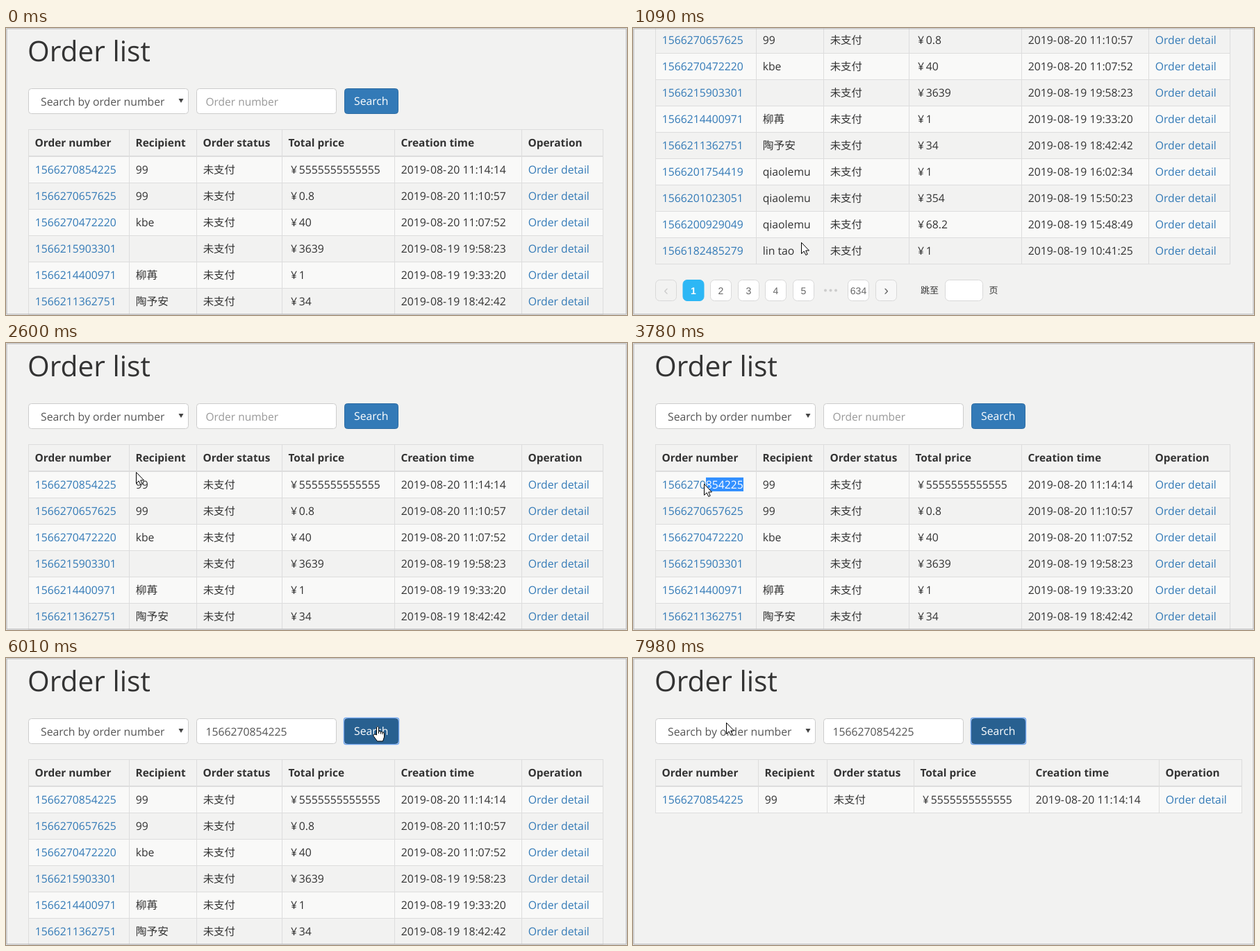
Recreate the animation shown at these times as an HTML page. Size 894x414 px, loop 8 s.

```html
<!DOCTYPE html>
<html lang="en">
<head>
<meta charset="utf-8">
<title>Order list</title>
<style>
  html, body { margin: 0; width: 100%; height: 100%; overflow: hidden; background: #f2f2f1; }
  svg { display: block; }
  text { font: 15.75px "Open Sans", "Noto Sans CJK SC", "Noto Sans CJK", sans-serif; fill: #333; text-rendering: geometricPrecision; white-space: pre; }
  .h1 { font-size: 40.7px; }
  .th { font-size: 15.4px; font-weight: 700; }
  .cjk { font-size: 15.4px; }
  .dash { letter-spacing: 1.2px; }
  .link { fill: #337ab7; }
  .field { fill: #555; }
  .hint { fill: #999; font-size: 15.5px; }
  .white { fill: #fff; }
  .page { font: 14px "Liberation Sans", Arial, sans-serif; fill: #666; text-anchor: middle; }
  .on { fill: #fff; font-weight: 700; }
  .step { font-size: 20px; }
  .off { fill: #ccc; }
  .jump { font-size: 13px; }
</style>
</head>
<body>
<svg id="stage" width="894" height="414" viewBox="0 0 894 414"></svg>
<script>
const LOOP = 8000, STEP = 80, SCROLL = 225, NUMBER = '1566270854225';

const heads = ['Order number', 'Recipient', 'Order status', 'Total price', 'Creation time', 'Operation'];
const orders = [
  [NUMBER, '99', '5555555555555', '20 11:14:14'],
  ['1566270657625', '99', '0.8', '20 11:10:57'],
  ['1566270472220', 'kbe', '40', '20 11:07:52'],
  ['1566215903301', '', '3639', '19 19:58:23'],
  ['1566214400971', '柳苒', '1', '19 19:33:20'],
  ['1566211362751', '陶予安', '34', '19 18:42:42'],
  ['1566201754419', 'qiaolemu', '1', '19 16:02:34'],
  ['1566201023051', 'qiaolemu', '354', '19 15:50:23'],
  ['1566200929049', 'qiaolemu', '68.2', '19 15:48:49'],
  ['1566182485279', 'lin tao', '1', '19 10:41:25']
];

const text = (x, y, s, cls = '') => `<text x="${x}" y="${y}" class="${cls}">${s}</text>`;
const box = (x, y, w, h, fill, stroke, r = 4, more = '') =>
  `<rect x="${x + .5}" y="${y + .5}" width="${w}" height="${h}" rx="${r}" fill="${fill}" stroke="${stroke}" ${more}/>`;

function table(cols, rows) {
  const left = cols[0], right = cols[cols.length - 1], bottom = 185 + 38 * rows.length;
  const dash = '<tspan class="dash">-</tspan>';
  let back = '', cells = '', lines = `M${left} 146.5H${right + 1}`;
  heads.forEach((h, i) => cells += text(cols[i] + 9.5, 171, h, 'th'));
  rows.forEach(([id, name, price, time], r) => {
    const y = 185 + 38 * r;
    if (r % 2 == 0) back += `<rect x="${left}" y="${y}" width="${right - left}" height="38" fill="#f9f9f8"/>`;
    lines += `M${left} ${y + 38.5}H${right + 1}`;
    const row = [[id, 'link'], [name], ['未支付', 'cjk'], ['¥'], [`2019${dash}08${dash}${time}`], ['Order detail', 'link']];
    row.forEach(([s, cls], i) => cells += text(cols[i] + (i == 3 ? 13 : 9.7), y + 25, s, cls));
    cells += text(cols[3] + 24.7, y + 25, price);
  });
  for (const x of cols) lines += `M${x + .5} 146V${bottom + 1}`;
  return `${back}<path d="${lines}" stroke="#ddd"/><path d="M${left} 185H${right + 1}" stroke="#ddd" stroke-width="2"/>${cells}`;
}

function pager() {
  const button = (x, s, cls, fill = '#fff', stroke = '#d9d9d9', y = 608.5) =>
    box(x, 588, 30, 30, fill, stroke, 6) + text(x + 15.5, y, s, 'page ' + cls);
  const dots = [277, 284.5, 292].map(x => `<circle cx="${x}" cy="603.5" r="2" fill="#ccc"/>`).join('');
  return button(32, '‹', 'step off', '#f2f2f1', '#d9d9d9', 610) + button(71.5, 1, 'on', '#2db7f5', '#2db7f5')
    + [2, 3, 4, 5].map((n, i) => button(111 + Math.round(i * 39.6), n, '')).join('')
    + dots + button(309, 634, '') + button(349, '›', 'step', '#f7f7f7', '#d9d9d9', 610)
    + text(414, 607.5, '跳至', 'jump') + box(449, 588, 54, 30, '#fff', '#d9d9d9', 6) + text(512.5, 607.5, '页', 'jump');
}

stage.innerHTML = `
  <clipPath id="clip"><rect id="range" y="194" height="20"/></clipPath>
  <g id="view">
    ${text(31, 48.3, 'Order list', 'h1')}
    ${box(32, 87, 230, 36, '#fff', '#ccc')}
    ${text(50, 112, 'Search by order number', 'field')}
    <path d="M248.5 102h7l-3.5 6z" fill="#444"/>
    <rect id="glow" x="272.5" y="85.5" width="205" height="40" rx="6" fill="none" stroke="#66afe9" stroke-width="3" opacity=".35"/>
    ${box(274, 87, 201, 36, '#fff', '#ccc', 4, 'id="field"')}
    <text id="value" x="287.5" y="112"></text>
    ${box(487, 87, 77, 36, '#337ab7', '#2e6da4', 4, 'id="button"')}
    ${box(486, 86, 79, 38, 'none', '#6ea5ee', 3, 'id="ring" stroke-width="1.5"')}
    ${text(501, 111, 'Search', 'white')}
    <g id="full">${table([32, 177, 274, 397, 559, 742, 859], orders)}${pager()}</g>
    <g id="found">${table([32, 180, 279, 404, 570, 757, 876], orders.slice(0, 1))}</g>
    <g id="marked" clip-path="url(#clip)">
      <rect x="42" y="194" width="117" height="20" fill="#3390ff"/>${text(41.7, 210, NUMBER, 'white')}
    </g>
  </g>
  <rect x="1" y="1" width="892" height="411.8" fill="none" stroke="#b9babc" stroke-width="1.2"/>
  <g id="cursor" fill="#fff" stroke="#000" stroke-linejoin="round">
    <path id="arrow" d="M.5 .5V16.5L4.2 13L6.8 18.5L9.2 17.4L6.7 12H11.5Z"/>
    <path id="beam" d="M-3 1.5h2.5l.5 .5l.5 -.5h2.5M0 2v13M-3 15.5h2.5l.5 -.5l.5 .5h2.5" fill="none"/>
    <path id="hand" d="M.5 13V2Q2 -.8 3.5 2V8Q5 6.6 6.4 8.6Q8 7.4 9 9.2Q11 8.6 11.5 11V16L9.5 22H1.5L-4 14.5Q-4.5 11.5 -2 12Z M3.5 8v3M6.4 8.6v3M9 9.2v3"/>
  </g>`;

// start time, then [step, x, y] points; one step lasts STEP ms
const moves = [
  [2280, [0, 242, 309], [5, 187, 186], [7, 176, 179], [11, 163, 203]],
  [3470, [0, 163, 203], [8, 40, 203]],
  [4410, [0, 40, 203], [1, 140, 232], [2, 212, 255]],
  [4730, [0, 212, 255], [1, 226, 258], [4, 343, 147], [8, 392, 104], [11, 400, 98]],
  [5610, [0, 400, 98], [5, 528, 100], [6, 533, 98]],
  [6170, [0, 533, 98], [4, 674, 279]],
  [6790, [0, 674, 279], [7, 144, 131]],
  [7420, [0, 144, 131], [4, 72, 118], [8, 134, 93]]
];

const $ = id => document.getElementById(id);
const show = (id, on) => $(id).style.display = on ? '' : 'none';
const set = (id, name, value) => $(id).setAttribute(name, value);
const stepsAt = (t, start, max) => Math.max(0, Math.min(max, Math.floor((t - start) / STEP) + 1));

function scrollAt(t) {
  if (t < 1560) return SCROLL * (1 - (1 - stepsAt(t, 290, 11) / 11) ** 1.6);
  return SCROLL * (1 - stepsAt(t, 1560, 6) / 6) ** 2.41;
}

function cursorAt(t) {
  const [start, ...points] = moves.filter(m => t >= m[0]).pop() || moves[0];
  const k = stepsAt(t, start, points[points.length - 1][0]);
  const i = Math.max(1, points.findIndex(p => p[0] >= k));
  const [k0, x0, y0] = points[i - 1], [k1, x1, y1] = points[i];
  const u = (k - k0) / (k1 - k0);
  return [Math.round(x0 + (x1 - x0) * u), Math.round(y0 + (y1 - y0) * u)];
}

function draw(t) {
  const [x, y] = cursorAt(t), inBar = y > 86 && y < 125;
  const overField = inBar && x > 274 && x < 476, overButton = inBar && x > 486 && x < 566;
  const focus = t >= 5450 && t < 6010, filled = t >= 5610, clicked = t >= 6010, done = t >= 6170;

  set('view', 'transform', `translate(0 ${-Math.round(scrollAt(t))})`);
  set('cursor', 'transform', `translate(${x} ${y})`);
  show('cursor', t >= 290);
  show('arrow', !overField && !overButton);
  show('beam', overField);
  show('hand', overButton);

  const start = t < 4410 ? Math.max(42, 42 + 9 * Math.round((x - 42) / 9)) : 42;
  set('range', 'x', start);
  set('range', 'width', Math.max(0, 159 - start));
  show('marked', t >= 3470 && t < 5450);

  show('glow', focus);
  set('field', 'stroke', focus ? '#66afe9' : '#ccc');
  $('value').textContent = filled ? NUMBER : 'Order number';
  set('value', 'class', filled ? 'field' : 'hint');
  set('button', 'fill', overButton || clicked ? '#286090' : '#337ab7');
  set('button', 'stroke', overButton || clicked ? '#204d74' : '#2e6da4');
  show('ring', clicked);
  show('full', !done);
  show('found', done);
}

function tick() {
  draw(performance.now() % LOOP);
  requestAnimationFrame(tick);
}
tick();
</script>
</body>
</html>
```
